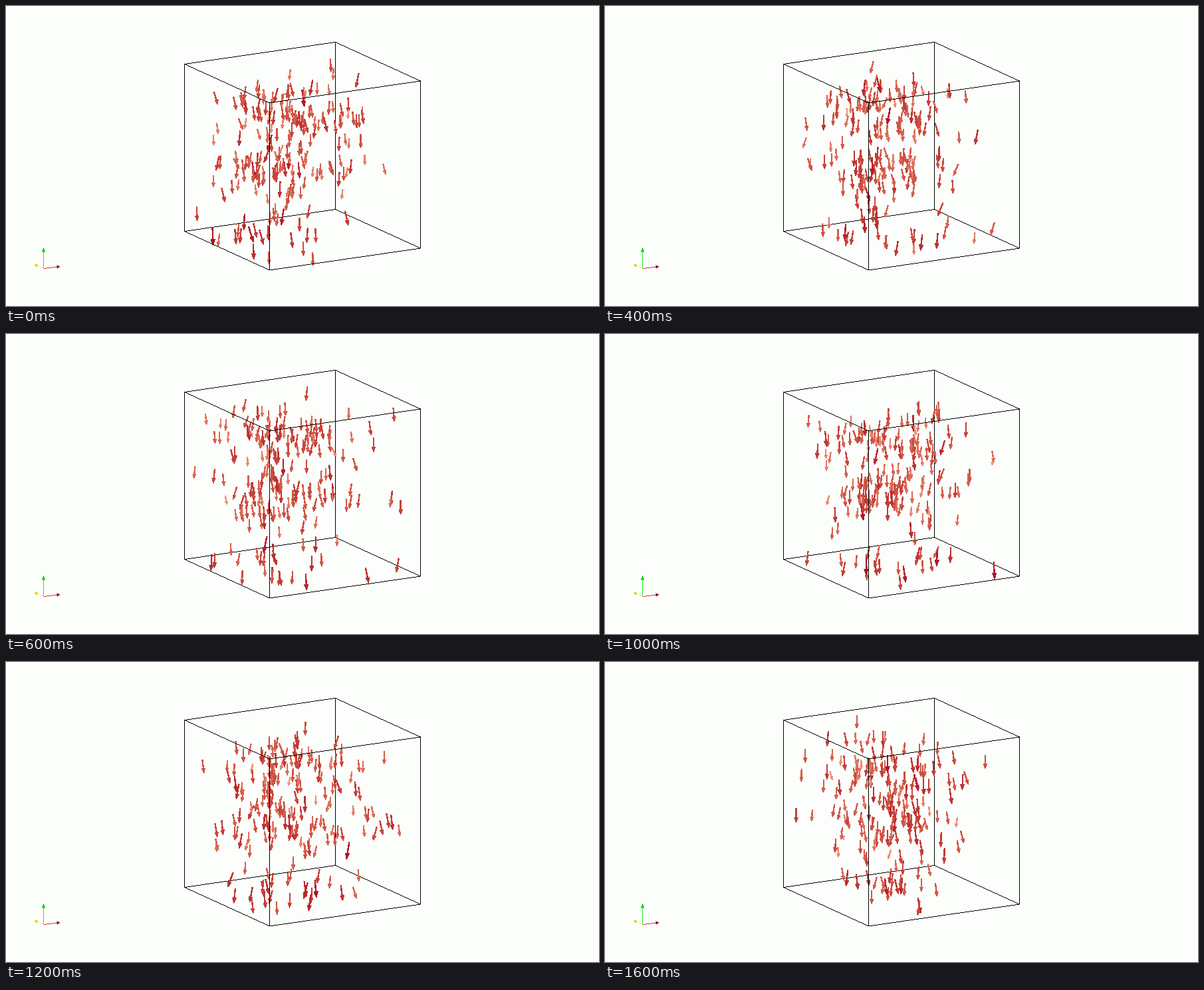
Recreate the animation shown at these times as a matplotlib script. Size 892x452 px, loop 1.8 s.

```python
import numpy as np
import matplotlib.pyplot as plt
from matplotlib.animation import FuncAnimation
from matplotlib.collections import PolyCollection

W, H, DPI = 892, 452, 64
FRAMES, STEP = 9, 200

# Parallel projection of the unit cube: x right, y towards the viewer, z down.
ORIGIN = np.array([268, 87])
AXES = np.array([[227, -33], [128, 58.5], [0, 252]])

# Layers of the flow: arrow count, mean depth, spread, mean speed.
LAYERS = [(78, 0.18, 0.08, 0.43), (76, 0.53, 0.075, 0.45),
          (24, 0.91, 0.035, 0.6), (14, 0.45, 0.22, 0.42)]

PALE, MID, DARK = np.array([[236, 150, 122], [205, 78, 64], [168, 14, 36]]) / 255


def project(points):
    return ORIGIN + np.asarray(points) @ AXES


def ramp(s):
    return np.column_stack([np.interp(s, [0, 0.5, 1], c) for c in zip(PALE, MID, DARK)])


def layer(rng, count, depth, spread, speed):
    """Arrow tails gathered around a core, with some strewn over the whole layer."""
    core = rng.normal((0.39, 0.48), (0.18, 0.22), (count, 2))
    strewn = rng.uniform(0.05, 0.95, (count, 2))
    plan = np.where(rng.random((count, 1)) < 0.25, strewn, core)
    depths = rng.normal(depth, spread, count)
    tails = project(np.clip(np.column_stack([plan, depths]), 0.03, 0.96))
    return tails, rng.normal(speed, 0.18, count)


def arrow(tail, angle, size):
    """Outline of a thin shaft with a cone-shaped head."""
    d = np.array([np.sin(angle), np.cos(angle)])
    n = np.array([d[1], -d[0]])
    neck, half, wide = 0.66 * size, 0.65, 0.8 + 0.085 * size
    shape = [(0, half), (neck, half), (neck, wide), (size, 0),
             (neck, -wide), (neck, -half), (0, -half)]
    return [tail + a * d + b * n for a, b in shape]


def field(step):
    rng = np.random.default_rng(40 + step)
    parts = [layer(rng, *spec) for spec in LAYERS]
    tails = np.concatenate([p[0] for p in parts])
    speed = np.clip(np.concatenate([p[1] for p in parts]), 0, 1)
    angle = rng.normal(0, 0.14, len(tails))
    shapes = [arrow(t, a, 13 + 14 * s) for t, a, s in zip(tails, angle, speed)]
    return shapes, ramp(speed)


def pixel_line(start, end, color, z):
    """Hard one-pixel line made of unit squares."""
    start, end = np.asarray(start, float), np.asarray(end, float)
    n = int(np.abs(end - start).max())
    cells = np.floor(np.linspace(start, end, n + 1) + 0.49)
    square = np.array([(0, 0), (1, 0), (1, 1), (0, 1)])
    ax.add_collection(PolyCollection(cells[:, None] + square, facecolors=color,
                                     linewidths=0, zorder=z))


def axis_arrow(end, head, line, tip, wide):
    start, end = np.array([56, 395]), np.array(end)
    d = (end - start) / np.linalg.norm(end - start)
    n = np.array([-d[1], d[0]]) * wide
    neck = end - d * head
    pixel_line(start, neck, line, 1)
    ax.add_patch(plt.Polygon(np.array([end, neck + n, neck - n]) + 0.5,
                             fc=tip, lw=0, zorder=2))


fig = plt.figure(figsize=(W / DPI, H / DPI), dpi=DPI, facecolor="#fcfefc")
ax = fig.add_axes([0, 0, 1, 1])
ax.set(xlim=(0, W), ylim=(H, 0))
ax.axis("off")

# Edges meeting at the hidden corner lie behind the arrows, the rest in front.
HIDDEN = (1, 0, 1)
for corner in np.ndindex(2, 2, 2):
    for k in range(3):
        if corner[k] == 0:
            other = tuple(c + (i == k) for i, c in enumerate(corner))
            z = 1 if HIDDEN in (corner, other) else 4
            pixel_line(project(corner), project(other), "black", z)

axis_arrow((56, 363), 7, "#20f020", "#00d800", 2.8)
axis_arrow((81, 392), 5, "#f03030", "#900000", 2.6)
axis_arrow((42, 389), 5, "#f4f080", "#dccc00", 2.5)

arrows = PolyCollection([], linewidths=0, antialiaseds=False, zorder=3)
ax.add_collection(arrows)


def draw(step):
    shapes, colors = field(step)
    arrows.set_verts(shapes)
    arrows.set_facecolor(colors)
    return [arrows]


anim = FuncAnimation(fig, draw, frames=FRAMES, interval=STEP, repeat=True,
                     repeat_delay=0, blit=False)
plt.show()
```
